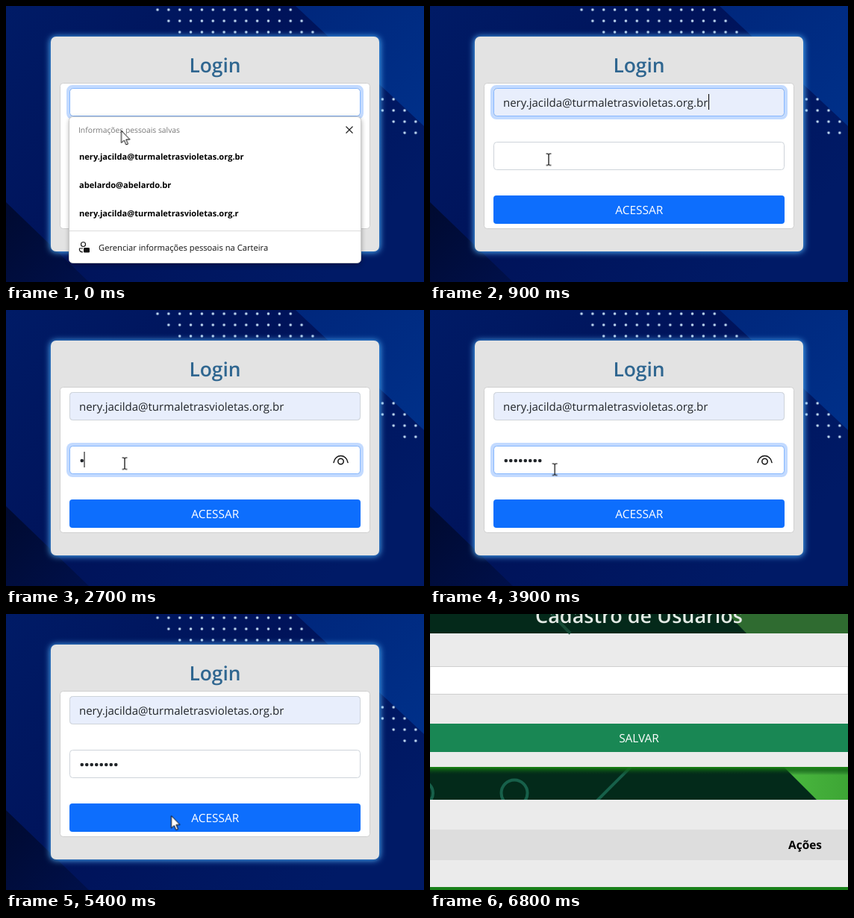
Animation, 560 px wide and 370 px high, one loop 8.1 s. Source, as an HTML page:

```html
<!DOCTYPE html>
<html lang="pt-BR">
<head>
<meta charset="utf-8">
<title>Login</title>
<style>
html, body { margin: 0; width: 100%; height: 100%; overflow: hidden; }
svg { display: block; width: 560px; height: 370px; }
text { font-family: "Open Sans", "Noto Sans", sans-serif; text-rendering: geometricPrecision; }
.mid { text-anchor: middle; }
.field { font-size: 15px; fill: #212529; }
.title { font-size: 27px; font-weight: 600; }
.btn { font-size: 15.4px; fill: #fff; }
.item { font-size: 11.1px; font-weight: 700; }
.caret { stroke: #000; stroke-width: 1; }
.ring { fill: #0d6efd; fill-opacity: .25; }
.focus { fill: none; stroke: #86b7fe; }

/* 8100 ms loop; 1.2346% is 100 ms */
.a { animation: 8.1s step-end infinite; }
#menu { animation-name: menu; }
#row, #fill { animation-name: hover; }
#mailCaret { animation-name: mail-caret; }
#mailFocus { animation-name: mail-focus; }
#passFocus { animation-name: pass-focus; }
#passCaret { animation-name: pass-caret; }
#typed { animation-name: type; }
#eye { animation-name: eye; }
#button { animation-name: press; }
#buttonRing { animation-name: press-ring; }
#users { animation-name: users; }
#pointer { animation-name: move; }
#arrow { animation-name: arrow; }
#beam { animation-name: beam; }
#hand { animation-name: hand; }

@keyframes menu { 0% { opacity: 1 } 9.8765%, 100% { opacity: 0 } }
@keyframes hover { 0% { opacity: 0 } 3.7037%, 100% { opacity: 1 } }
@keyframes mail-caret { 0% { opacity: 0 } 9.8765% { opacity: 1 } 17.2839%, 100% { opacity: 0 } }
@keyframes mail-focus { 0% { opacity: 1 } 20.9876%, 100% { opacity: 0 } }
@keyframes pass-focus {
  0% { opacity: 0 } 20.9876% { opacity: 1 } 61.7283% { opacity: .4 } 62.9629%, 100% { opacity: 0 }
}
@keyframes pass-caret {
  0% { opacity: 0 } 20.9876% { opacity: 1 } 28.395% { opacity: 0 } 33.3333% { opacity: 1 }
  48.148% { opacity: 0 } 54.3209% { opacity: 1 } 61.7283%, 100% { opacity: 0 }
}
@keyframes type {
  0% { transform: translateX(0) }
  33.3333% { transform: translateX(6.5px); animation-timing-function: steps(7) }
  41.9753%, 100% { transform: translateX(52px) }
}
@keyframes eye { 0% { opacity: 0 } 33.3333% { opacity: 1 } 61.7283%, 100% { opacity: 0 } }
@keyframes press {
  0% { fill: #0d6efd } 54.3209% { fill: #0b5ed7 } 61.7283% { fill: #0a58ca } 66.6666%, 100% { fill: #0d6efd }
}
@keyframes press-ring {
  0% { opacity: 0 } 61.7283% { opacity: .6 } 62.9629% { opacity: 1 } 66.6666%, 100% { opacity: 0 }
}
@keyframes users { 0% { opacity: 0 } 69.1358%, 100% { opacity: 1 } }
@keyframes move {
  0% { transform: translate(154.5px, 167px); animation-timing-function: steps(5) }
  6.1728% { transform: translate(159px, 205.5px) }
  46.9135% { transform: translate(159px, 205.5px); animation-timing-function: steps(7) }
  55.5555% { transform: translate(216px, 261.5px); animation-timing-function: steps(2) }
  58.0246% { transform: translate(221.5px, 270.5px) }
  79.0123% { transform: translate(221.5px, 270.5px); animation-timing-function: steps(4) }
  83.9506%, 100% { transform: translate(-68px, 62px) }
}
@keyframes arrow {
  0% { opacity: 1 } 9.8765% { opacity: 0 } 49.3827% { opacity: 1 }
  54.3209% { opacity: 0 } 66.6666%, 100% { opacity: 1 }
}
@keyframes beam { 0% { opacity: 0 } 9.8765% { opacity: 1 } 49.3827%, 100% { opacity: 0 } }
@keyframes hand { 0% { opacity: 0 } 54.3209% { opacity: 1 } 66.6666%, 100% { opacity: 0 } }
</style>
</head>
<body>
<svg viewBox="0 0 560 370">
  <defs>
    <linearGradient id="night" x2="1" y2=".6">
      <stop stop-color="#001b66"/><stop offset=".5" stop-color="#00135a"/><stop offset="1" stop-color="#001a66"/>
    </linearGradient>
    <linearGradient id="beamBlue" x1="0" y1="0" x2="1" y2="1">
      <stop stop-color="#00277c"/><stop offset="1" stop-color="#003089"/>
    </linearGradient>
    <linearGradient id="corner" x2="1" y2="1">
      <stop stop-color="#000a30"/><stop offset="1" stop-color="#00104a"/>
    </linearGradient>
    <linearGradient id="edge" x2="0" y2="1">
      <stop stop-color="#1c8a14"/><stop offset=".4" stop-color="#0f5f14" stop-opacity=".7"/>
      <stop offset="1" stop-color="#04301a" stop-opacity="0"/>
    </linearGradient>
    <linearGradient id="leaf" x2="1" y2="0">
      <stop stop-color="#4bb93f"/><stop offset="1" stop-color="#3da535"/>
    </linearGradient>
    <pattern id="dots" x="195.6" y="-2.5" width="14.85" height="15" patternUnits="userSpaceOnUse">
      <circle cx="7.4" cy="7.5" r="1.75" fill="#c3dcf5"/>
    </pattern>
    <filter id="glow" x="-10%" y="-10%" width="120%" height="120%"><feGaussianBlur stdDeviation="4"/></filter>
    <filter id="soft" x="-10%" y="-10%" width="120%" height="120%"><feGaussianBlur stdDeviation="3"/></filter>
  </defs>

  <g id="login">
    <rect width="560" height="370" fill="url(#night)"/>
    <path d="M388 0H560V161Z" fill="url(#beamBlue)"/>
    <path d="M0 263L111 370H0Z" fill="url(#corner)"/>
    <path d="M188-3H381L424 40H231Z" fill="url(#dots)"/>
    <path d="M490 117H518L578 177H534L497 140H490Z" fill="url(#dots)" transform="translate(4.3 0)"/>

    <rect x="59" y="41" width="442" height="289" rx="8" fill="#4fb4ff" filter="url(#glow)"/>
    <rect x="60" y="41" width="440" height="288" rx="7" fill="#e3e3e3"/>
    <text class="title mid" x="280" y="89" fill="#2f6690" style="font-size:26.4px">Login</text>
    <rect x="72.5" y="103.5" width="415" height="195" rx="4" fill="#fff" stroke="#cfcfcf"/>

    <rect x="85.5" y="110.5" width="389" height="37" rx="4" fill="#fff" stroke="#ced4da"/>
    <g id="fill" class="a">
      <rect x="85.5" y="110.5" width="389" height="37" rx="4" fill="#e8eefc" stroke="#ced4da"/>
      <text class="field" x="98" y="135">nery.jacilda@turmaletrasvioletas.org.br</text>
    </g>
    <g id="mailFocus" class="a">
      <path class="ring" fill-rule="evenodd" d="M89 106H471a8 8 0 0 1 8 8V144a8 8 0 0 1-8 8H89a8 8 0 0 1-8-8V114a8 8 0 0 1 8-8ZM89 110a4 4 0 0 0-4 4V144a4 4 0 0 0 4 4H471a4 4 0 0 0 4-4V114a4 4 0 0 0-4-4Z"/>
      <rect class="focus" x="85.5" y="110.5" width="389" height="37" rx="4"/>
    </g>
    <path id="mailCaret" class="caret a" d="M373.5 118V139"/>

    <rect x="85.5" y="182.5" width="389" height="37" rx="4" fill="#fff" stroke="#ced4da"/>
    <g id="passFocus" class="a">
      <rect class="ring" x="81" y="178" width="398" height="46" rx="8"/>
      <rect class="focus" x="85.5" y="182.5" width="389" height="37" rx="4" style="fill:#fff"/>
    </g>
    <path d="M101.75 202H148" stroke="#212529" stroke-width="4.6" stroke-linecap="round" stroke-dasharray="0 6.5"/>
    <g id="typed" class="a">
      <rect x="98" y="190" width="58" height="22" fill="#fff"/>
      <path id="passCaret" class="caret a" d="M98.5 190V211"/>
    </g>
    <g id="eye" class="a" fill="none" stroke="#111" stroke-width="1.5" stroke-linecap="round">
      <path d="M439 204.5C441 192.500 456 192.500 458 204.5"/>
      <circle cx="448.500" cy="203" r="3.700"/>
    </g>

    <rect id="buttonRing" class="ring a" x="81" y="250" width="398" height="46" rx="8" style="fill:#3184fd;fill-opacity:.5"/>
    <rect id="button" class="a" x="85" y="254" width="390" height="38" rx="4"/>
    <text class="btn mid" x="280.3" y="279">ACESSAR</text>

    <g id="menu" class="a">
      <rect x="85" y="150" width="391" height="197" rx="6" opacity=".35" filter="url(#soft)"/>
      <rect x="84.5" y="148.500" width="391" height="196" rx="5" fill="#fff" stroke="#c9c9c9"/>
      <rect id="row" class="a" x="85" y="183" width="390" height="38" fill="#f0f0f0"/>
      <text x="97" y="170" font-size="10.3" fill="#767676">Informações pessoais salvas</text>
      <path d="M455.500 161.500l9 9m0-9l-9 9" stroke="#222" stroke-width="1.200"/>
      <text class="item" x="98" y="206">nery.jacilda@turmaletrasvioletas.org.br</text>
      <text class="item" x="98" y="244">abelardo@abelardo.br</text>
      <text class="item" x="98" y="282">nery.jacilda@turmaletrasvioletas.org.r</text>
      <path d="M85 301.500H475" stroke="#dcdcdc"/>
      <g fill="none" stroke="#1b1b1b" stroke-width="1.200">
        <circle cx="103.500" cy="319.500" r="3"/>
        <path d="M103 325H98.500Q97.500 329.500 103 330"/>
      </g>
      <rect x="104" y="324" width="8" height="6.500" rx="1.200" fill="#111"/>
      <text x="124" y="328" font-size="11.2" fill="#111">Gerenciar informações pessoais na Carteira</text>
    </g>
  </g>

  <g id="users" class="a">
    <rect width="560" height="370" fill="#ebebeb"/>
    <rect width="560" height="26" fill="#04291a"/>
    <path d="M399 0H560V26H424Z" fill="#2f6b30"/>
    <path d="M163 0l25 26" stroke="#164a35" stroke-width="4"/>
    <text class="title mid" x="280" y="12" fill="#e4eae5">Cadastro de Usuários</text>

    <path d="M0 70.500H560V107.500H0Z" fill="#fff" stroke="#cfcfcf"/>
    <rect y="147" width="560" height="38" fill="#198754"/>
    <text class="btn mid" x="280" y="172">SALVAR</text>

    <svg y="205" width="560" height="44" viewBox="0 205 560 44">
      <rect y="205" width="560" height="44" fill="#032a1a"/>
      <g fill="none" stroke="#17604a" stroke-width="4">
        <circle cx="113" cy="240" r="17.500"/>
        <circle cx="-12" cy="240" r="16"/>
        <path d="M223 251l46-46"/>
      </g>
      <path d="M474 205H560V249H518Z" fill="url(#leaf)"/>
      <rect y="205" width="560" height="11" fill="url(#edge)"/>
    </svg>

    <rect y="289" width="560" height="41" fill="#ddd"/>
    <text class="mid" x="502.500" y="315" font-size="15.400" font-weight="700">Ações</text>
    <rect y="366" width="560" height="4" fill="#19801a"/>
  </g>

  <g id="pointer" class="a">
    <path id="arrow" class="a" d="M0 0V16.500L3.800 13L6.400 19L9 17.900L6.400 12H11.500Z" fill="#fff" stroke="#000"/>
    <path id="beam" class="a" d="M-3.500-7.500H-1.500L0-6.500L1.500-7.500H3.500M0-6.500V7M-3.500 8H-1.500L0 7L1.500 8H3.500" fill="none" stroke="#000" stroke-width="1.200"/>
    <path id="hand" class="a" d="M-2 1Q-2-.8 0-.8T2 1V7.500Q4.800 6 5.600 8.300Q8.200 7.200 8.900 9.300Q12 8.500 12 11.500V15Q12 18 9.800 20.500V22.500H.5V20.500L-5.500 13Q-6.300 10.500-4.500 10.200Q-3.300 10.200-2 12Z" fill="#fff" stroke="#000" stroke-width="1.100" stroke-linejoin="round"/>
  </g>
</svg>
</body>
</html>
```
